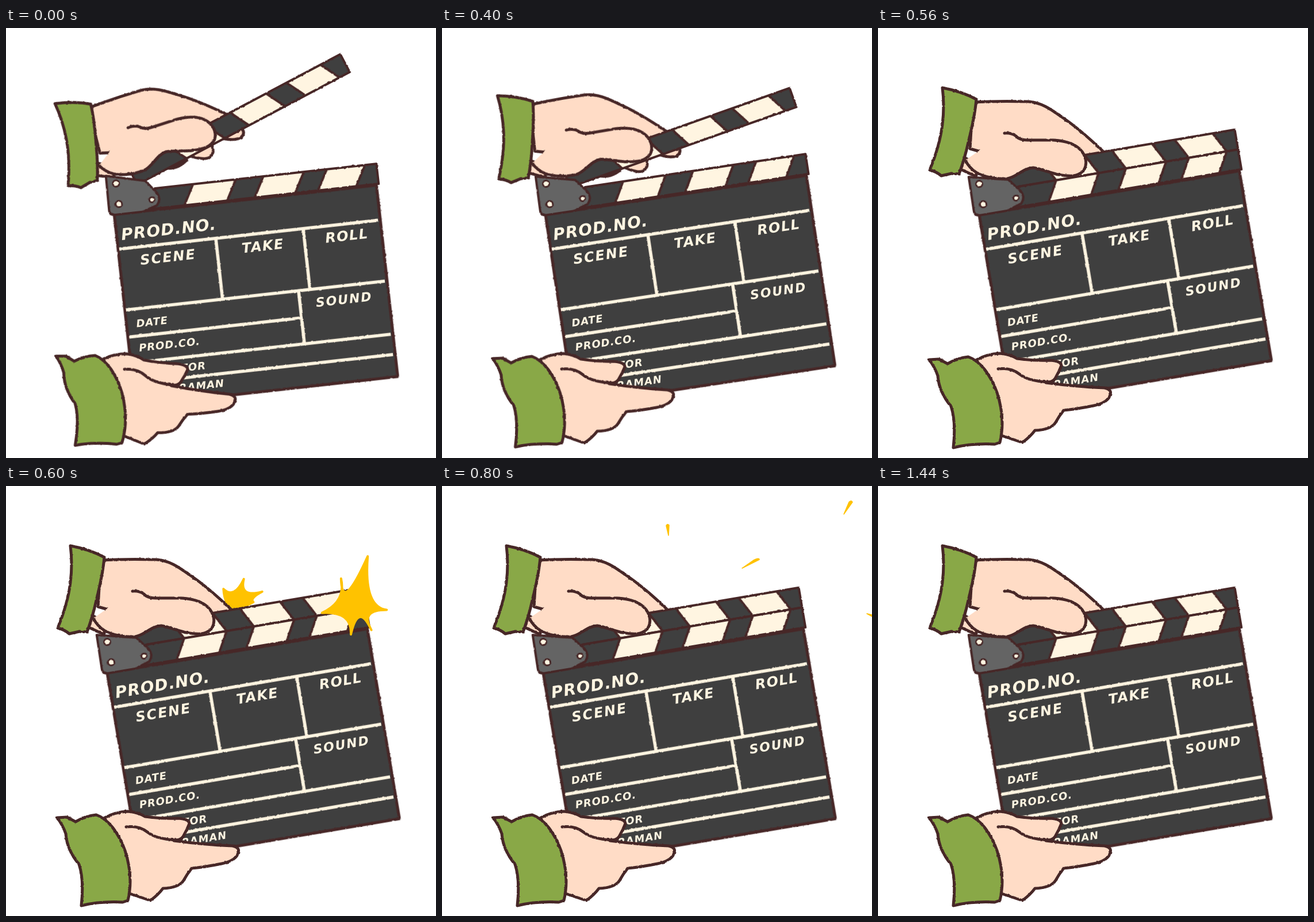
Recreate the animation shown at these times as an HTML page. Size 748 by 748 pixels, loop 1.8 s.

```html
<!DOCTYPE html>
<html lang="en">
<head>
<meta charset="utf-8">
<title>Clapperboard</title>
<style>
  html, body { margin: 0; width: 100%; height: 100%; overflow: hidden; background: #fff; }
  svg { display: block; width: 100%; height: 100%; }
  .rough { filter: url(#rough); }
  .ink { stroke: #472727; stroke-width: 5; stroke-linejoin: round; stroke-linecap: round; }
  .thin { stroke-width: 4; }
  .dark { fill: #3f3f3f; }
  .cream { fill: #fff5e1; }
  .skin { fill: #ffdcc6; }
  .green { fill: #89a847; }
  .none { fill: none; }
  .chalk { fill: none; stroke: #fff5e1; stroke-width: 5.5; }
  .spark { fill: #ffc200; stroke: #ffc200; stroke-width: 4; stroke-linejoin: round; vector-effect: non-scaling-stroke; }
  text { font: italic bold 18px "DejaVu Sans", sans-serif; fill: #fff5e1; }
</style>
</head>
<body>
<svg viewBox="0 0 748 748">
  <defs>
    <filter id="rough" filterUnits="userSpaceOnUse" x="-100" y="-100" width="950" height="950" color-interpolation-filters="sRGB">
      <feTurbulence type="fractalNoise" baseFrequency=".2" numOctaves="2" seed="4"/>
      <feDisplacementMap in="SourceGraphic" scale="2.5" xChannelSelector="R" yChannelSelector="G"/>
    </filter>
    <g id="bar" class="ink thin">
      <rect class="dark" x="45" width="418" height="35"/>
      <g id="stripes" class="cream"></g>
      <rect class="none" x="45" width="418" height="35"/>
    </g>
  </defs>

  <path id="burstBack" class="spark" d="M359 142Q398 180 433 106Q416 175 500 152Q452 177 468 190L400 225Q362 201 359 142Z"/>

  <g class="hand rough ink skin">
    <path d="M258 268Q276 280 300 268L290 255Z" fill="#472727"/>
    <path d="M404 241Q413 250 406 257Q396 265 372 252L380 230Z"/>
    <path d="M349 256Q351 269 343 274Q333 281 306 262L330 245Z"/>
    <path d="M165 129C200 127 230 127 262 128C285 130 300 141 320 155Q350 175 392 215L360 236L250 235L160 210Z"/>
    <path d="M140 244Q155 251 170 258L175 240L150 225Z"/>
  </g>

  <g id="arm">
    <g class="plane rough"><use href="#bar" transform="translate(0 -37) scale(1 -1)"/></g>
  </g>

  <g class="board">
    <g class="plane">
      <g class="rough">
        <rect class="ink dark" width="459" height="335"/>
        <use href="#bar" transform="translate(0 -37)"/>
        <path class="chalk" d="M2 61H455M2 167.5H455M2 215H302M2 260.5H455M2 296H455M171 61V167M324 61V167M304 167V260"/>
        <path class="ink thin" fill="#646464" d="M-7-68L60-52L78-29Q85-17 75-7L50 1H2Q-8 1-8-8Z"/>
        <g class="ink cream" style="stroke-width:3">
          <circle cx="9" cy="-53" r="5.5"/>
          <circle cx="10" cy="-17" r="5.5"/>
          <circle cx="68" cy="-18" r="4.5"/>
        </g>
      </g>
      <g id="labels"></g>
    </g>
  </g>

  <g class="hand rough ink">
    <path class="skin" d="M220 183Q232 182 240 188Q246 195 260 195L305 195Q341 197 355 215Q364 228 361 240Q358 254 340 257C312 259 290 246 270 243C252 244 242 259 225 262Q195 264 172 252Q158 243 152 230"/>
    <path class="green" d="M112 104Q145 110 171 124C168 160 160 185 154 212Q148 235 141 254L128 253L110 257Q102 250 90 247C99 225 108 200 112 168Q116 135 112 104Z"/>
  </g>

  <g class="board rough ink">
    <path class="skin" d="M172 577Q190 567 212 566Q228 567 242 575Q270 579 298 578Q318 579 319 587Q315 598 308 610Q304 616 292 617Q345 624 394 626Q407 629 404 637Q402 651 375 657Q345 663 323 665Q315 675 309 686Q301 699 273 700Q264 712 251 721L212 708Z"/>
    <path class="none" d="M209 593Q231 590 246 602Q262 615 300 616"/>
    <path class="green" d="M89 577L106 576L121 584Q138 574 157 572C178 579 196 604 207 634Q222 680 212 721L203 724Q165 722 131 730Q136 685 127 658Q106 633 104 605Q99 590 89 577Z"/>
  </g>

  <path id="burstFront" class="spark" d="M673 66Q662 205 725 213Q651 213 683 268Q647 191 627 280Q630 216 548 221Q614 191 600 127Q602 224 673 66Z"/>
  <path id="sparks" class="spark" style="stroke-width:1.5" d="M394 86L390 69Q392 65 395 68ZM699 49L708 28Q712 24 714 28ZM522 143L542 129Q552 124 552 128ZM739 222L770 230L768 238Z"/>
</svg>
<script>
const $ = id => document.getElementById(id);
const all = selector => document.querySelectorAll(selector);
const setTransform = (elements, value) => elements.forEach(el => el.setAttribute('transform', value));

// The board and both bars are drawn flat, then tilted into place.
setTransform(all('.plane'), 'translate(176 325) rotate(-9.6)');

// Stripes get slightly narrower and closer towards the far end.
for (let i = 0; i < 3; i++) {
  const x = 123 + i * (129 - 6 * i), width = 75 - 4 * i;
  $('stripes').innerHTML += `<path d="M${x + 19} 0h${width}l-19 35h${-width}Z"/>`;
}

function label(text, x, y, size = 18, spacing = 1, anchor = 'start') {
  $('labels').innerHTML +=
    `<text x="${x}" y="${y}" font-size="${size}" text-anchor="${anchor}" style="font-size:${size}px;letter-spacing:${spacing}px">${text}</text>`;
}
label('PROD.NO.', 8, 46, 28, 1.2);
label('SCENE', 85, 92.5, 24, 2, 'middle');
label('TAKE', 251, 91.5, 24, 1.5, 'middle');
label('ROLL', 398, 90, 24, 1.5, 'middle');
label('SOUND', 381, 199, 22, 2, 'middle');
label('DATE', 17, 199.5);
label('PROD.CO.', 17, 242);
label('DIRECTOR', 19, 285);
label('CAMERAMAN', 17, 319);

// open: how far the arm is raised; tilt: turn of the board; front, back: burst sizes
const poses = [
  { until: 400, open: 1, tilt: 3.25 },
  { until: 500, open: .54, tilt: 1.05 },
  { until: 600 },
  { until: 700, front: .635, back: .478 },
  { until: 800, front: 1, back: 1 },
  { until: 900, sparks: 1 },
  { until: 1800 }
];

function grow(id, size, x, y) {
  setTransform([$(id)], `translate(${x} ${y}) scale(${size}) translate(${-x} ${-y})`);
  $(id).style.display = size ? '' : 'none';
}

const start = performance.now();
let shown;

function draw() {
  const time = Math.max(0, performance.now() - start) % 1800;
  const pose = poses.find(p => time < p.until);
  if (pose !== shown) {
    shown = pose;
    const { open = 0, tilt = 0, front = 0, back = 0, sparks = 0 } = pose;
    setTransform(all('.board'), `rotate(${tilt} 197 540)`);
    setTransform(all('#arm'), `rotate(${-18.3 * open} 194 232.5)`);
    setTransform(all('.hand'), `rotate(${-17.9 * open} 186 203)`);
    grow('burstFront', front, 553, 220);
    grow('burstBack', back, 396, 213);
    $('sparks').style.display = sparks ? '' : 'none';
  }
  requestAnimationFrame(draw);
}
draw();
</script>
</body>
</html>
```
